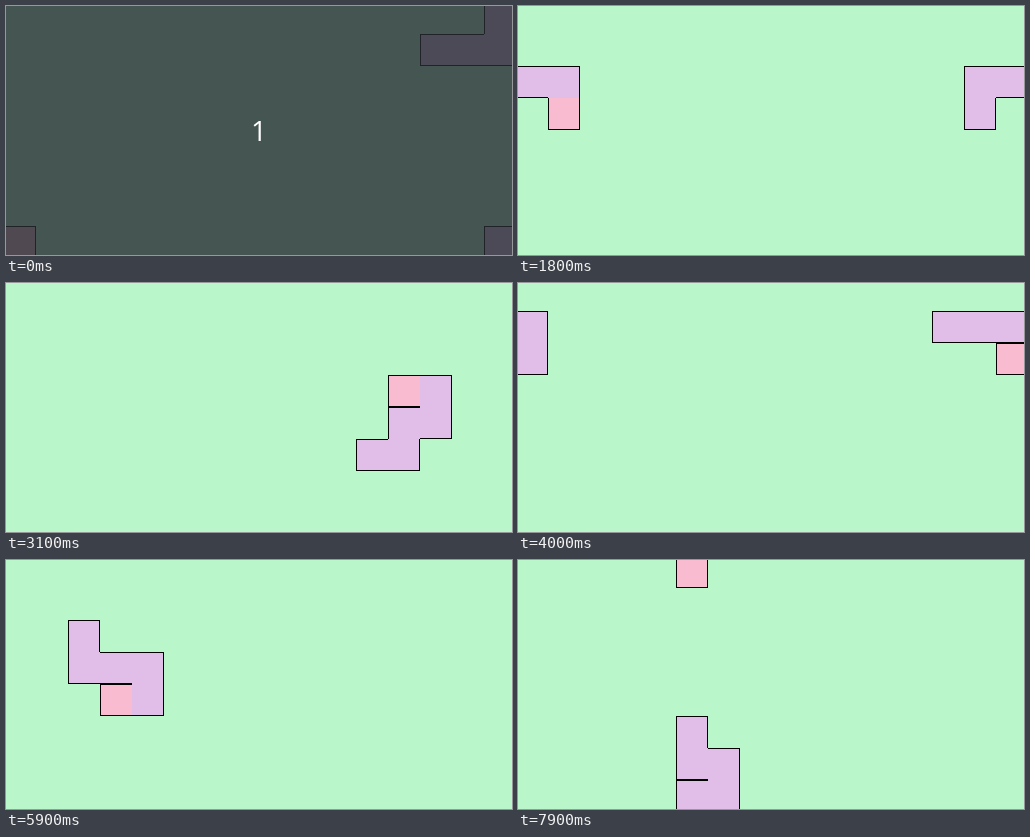
An HTML page with a canvas that plays this animation: 506x249 px, repeating every 8 s.

```html
<!DOCTYPE html>
<html lang="en">
<head>
<meta charset="utf-8">
<title>Snake</title>
<style>
  html, body { margin: 0; width: 100%; height: 100%; overflow: hidden; background: #b9f6ca; }
  canvas { display: block; }
</style>
</head>
<body>
<canvas id="stage" width="506" height="249"></canvas>
<script>
const ctx = document.getElementById('stage').getContext('2d');
const W = 506, H = 249, CELL = 32, COLS = 16, ROWS = 8;
const LOOP = 8000, FRAME = 100, STEP = 87.6, PHASE = 0.78, LENGTH = 6;
const DIRS = { U: [0, -1], D: [0, 1], L: [-1, 0], R: [1, 0] };
const MOVES = 'RRUUR' + 'DRURDDD' + 'DDLLLLLURURRRD' + 'DLLLLDDLLURURUL' +
  'UUURDRRRDLLLLURRRUURD' + 'DDDRURDRRDL' + 'LLURRRDDDDRRRUULLDRDLD';

// Move on a board whose edges wrap around
const shift = ([x, y], [dx, dy]) => [(x + dx + COLS) % COLS, (y + dy + ROWS) % ROWS];
const same = (a, b) => a && b && a[0] === b[0] && a[1] === b[1];

const path = [[13, 1]];
for (const m of MOVES) path.push(shift(path[path.length - 1], DIRS[m]));

function rect(color, x, y, w, h) {
  ctx.fillStyle = color;
  ctx.fillRect(x, y, w, h);
}

function drawSnake(snake) {
  snake.forEach((cell, i) => {
    const x = cell[0] * CELL - 2, y = cell[1] * CELL - 4;
    rect(i === LENGTH - 1 ? '#f8bbd0' : '#e1bee7', x, y, CELL, CELL);
    // Outline only the sides that do not join the next or previous segment
    const edge = (dir, ...box) => {
      const next = shift(cell, DIRS[dir]);
      if (!same(next, snake[i - 1]) && !same(next, snake[i + 1])) rect('#000', ...box);
    };
    edge('U', x, y, CELL, 1);
    edge('D', x, y + CELL - 1, CELL, 1);
    edge('L', x, y, 1, CELL);
    edge('R', x + CELL - 1, y, 1, CELL);
  });
}

function drawCountdown() {
  rect('rgba(41, 46, 52, 0.8)', 0, 0, W, H);
  ctx.fillStyle = '#fff';
  ctx.font = '28px "Open Sans", "Noto Sans", sans-serif';
  ctx.textAlign = 'center';
  ctx.fillText('1', 253, 135);
}

function draw(now) {
  const t = Math.floor((now % LOOP) / FRAME) * FRAME;
  const n = Math.floor(t / STEP + PHASE);
  rect('#b9f6ca', 0, 0, W, H);
  drawSnake(path.slice(n, n + LENGTH));
  if (t < FRAME) drawCountdown();
}

const start = performance.now();
function tick() {
  draw(performance.now() - start);
  requestAnimationFrame(tick);
}
tick();
</script>
</body>
</html>
```
